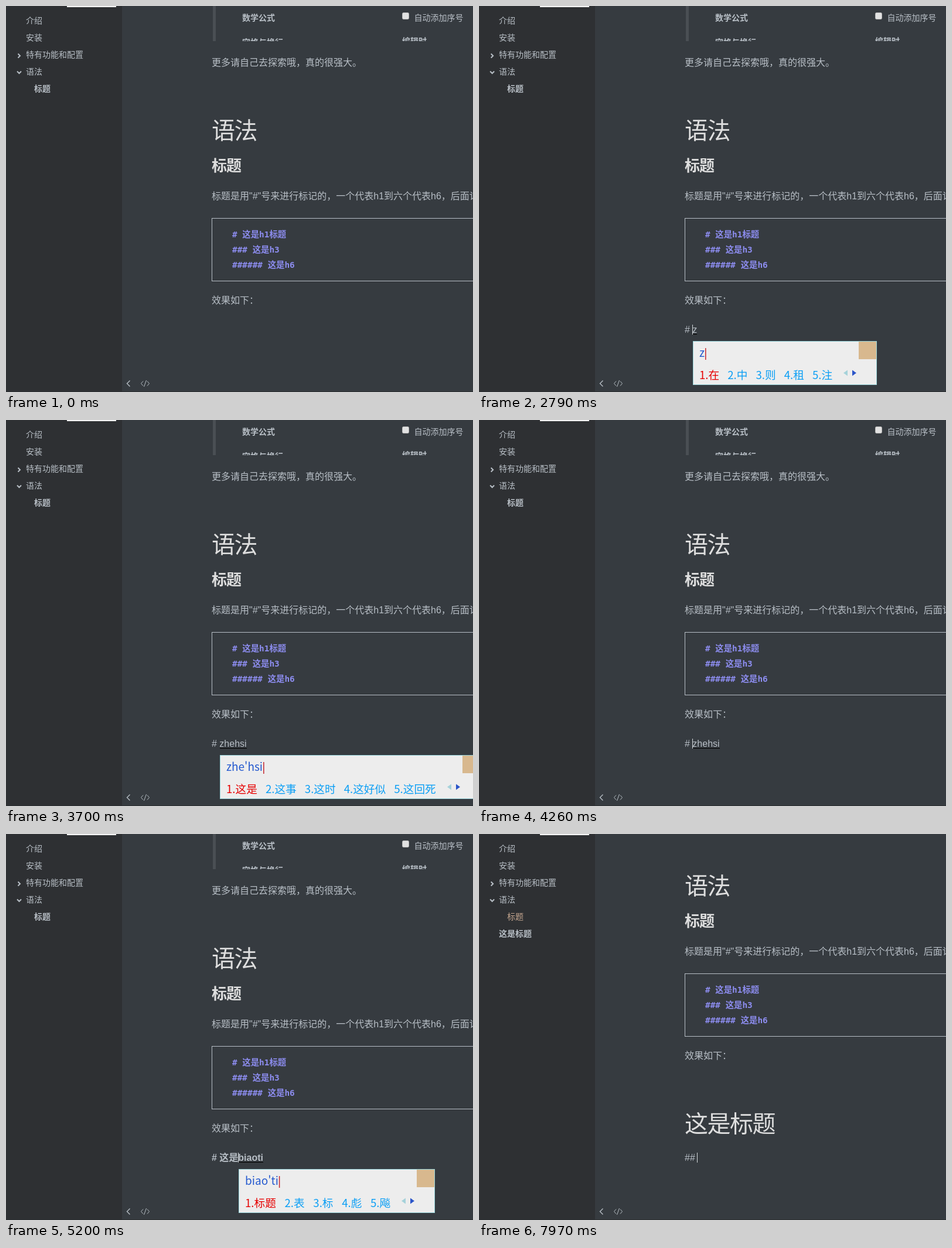
Recreate the animation shown at these times as an HTML page. Size 797 by 659 pixels, loop 8 s.

```html
<!DOCTYPE html>
<html lang="zh-CN">
<head>
<meta charset="utf-8">
<title>Markdown 标题</title>
<style>
html, body { margin: 0; width: 100%; height: 100%; overflow: hidden; background: #363b40; }
svg { display: block; width: 797px; height: 659px; }
text { font: 16px "Liberation Sans", "Noto Sans CJK SC", "Noto Sans CJK", sans-serif; fill: #b8bfc6; white-space: pre; }
.small text, text.small { font-size: 14px; }
text.bold { font-weight: bold; }
text.h1 { font-size: 40px; letter-spacing: -1.5px; fill: #dedede; }
text.h2 { font-size: 26.08px; letter-spacing: -1px; font-weight: bold; fill: #dedede; }
.code text { font: bold 14.4px "DejaVu Sans Mono", "Noto Sans CJK SC", "Noto Sans CJK", monospace; fill: #8d8df0; }
#popup text { font: 18.67px "Noto Sans CJK SC", "Noto Sans CJK", sans-serif; fill: #0c9ff5; }
#popup #spelling { font-size: 19px; fill: #2459cf; }
#popup .first { fill: #e60000; }
.icon { fill: none; stroke: #b8bfc6; }
</style>
</head>
<body>
<svg viewBox="0 0 797 659">
  <rect width="797" height="659" fill="#363b40"/>
  <g id="page">
    <rect x="353" width="5" height="60" fill="#4a4f54"/>
    <text class="small bold" x="403" y="25">数学公式</text>
    <rect x="676.5" y="11.5" width="11" height="11" rx="2" fill="#e2e2e2" stroke="#b4b4b4"/>
    <text class="small" x="696.5" y="25">自动添加序号</text>
    <text class="small bold" x="403" y="67">空格与换行</text>
    <text class="small bold" x="676" y="65">编辑时</text>
    <rect x="351" y="60" width="446" height="20" fill="#363b40"/>
    <text x="351" y="102">更多请自己去探索哦，真的很强大。</text>
    <text class="h1" x="351" y="227">语法</text>
    <text class="h2" x="351" y="282">标题</text>
    <text x="351" y="330">标题是用"#"号来进行标记的，一个代表h1到六个代表h6，后面记得加空格</text>
    <rect x="351.5" y="362.5" width="460" height="107" fill="none" stroke="#b8bfc6"/>
    <g class="code">
      <text x="386" y="395">#&#32;这是h1标题</text>
      <text x="386" y="421">### 这是h3</text>
      <text x="386" y="447">###### 这是h6</text>
    </g>
    <text x="351" y="508">效果如下：</text>
  </g>
  <text id="newHeading" class="h1" x="351" y="509">这是标题</text>
  <text id="line" x="351" y="558"></text>
  <rect id="underline" y="560" height="1" fill="#000"/>
  <rect id="caret" width="1" height="17" fill="#d5d9dd"/>

  <g class="small">
    <rect width="198" height="659" fill="#2e3033"/>
    <rect x="104" width="84" height="2" fill="#f4f4f4"/>
    <text x="34" y="30">介绍</text>
    <text x="34" y="59">安装</text>
    <text x="34" y="88">特有功能和配置</text>
    <text x="34" y="117">语法</text>
    <text id="subItem" x="48" y="146">标题</text>
    <text id="newItem" class="bold" x="34" y="175">这是标题</text>
    <path class="icon" stroke-width="2" d="M20.5 81.5l3.5 3.5-3.5 3.5M19 111.5l3.5 3.5 3.5-3.5"/>
  </g>
  <path class="icon" stroke-width="1.4" d="M211.5 639.5l-5 5 5 5"/>
  <path class="icon" d="M234 640.5l-3.5 4 3.5 4M241 640.5l3.5 4-3.5 4M239.5 639l-4 11"/>
  <rect y="658" width="797" height="1" fill="#2b2e31"/>

  <g id="popup">
    <rect id="panel" x=".5" y="572.5" height="74" fill="#ededed" stroke="#9bd8de"/>
    <rect id="badge" y="573" width="30" height="30" fill="#d8b88e"/>
    <text id="spelling" x="11" y="599"></text>
    <rect id="popupCaret" y="584" width="1.5" height="20" fill="#c4262e"/>
    <g id="choices"></g>
    <g id="arrows">
      <path d="M26 621.5v10l-7-5z" fill="#a5d2da"/>
      <path d="M34 621.5v10l7-5z" fill="#2b55c9"/>
    </g>
  </g>
</svg>
<script>
const LOOP = 8000, ENTER = 6060, OUTLINE = 6290;
const $ = id => document.getElementById(id);
const set = (el, attrs) => { for (const k in attrs) el.setAttribute(k, attrs[k]); };
const show = (el, on) => set(el, { visibility: on ? "visible" : "hidden" });

const candidates = {
  "z": "在 中 则 租 注",
  "zh": "这 中 着 只 主",
  "zhe": "这 着 这个 者 这是",
  "zhe'h": "这会 这好 这和 折合 这后",
  "zhe'h's": "这会是 这还是 这好似 这和 折合",
  "zhe'hsi": "这是 这事 这时 这好似 这回死",
  "b": "不 吧 把 被 比",
  "bi": "比 必 笔 闭 毕",
  "bi'a": "比啊 笔暗 必爱 彼岸 避安",
  "biao": "表 标 彪 飚 镖",
  "biao't": "标题 表态 表头 标贴 表图",
  "biao'ti": "标题 表 标 彪 飚"
};

// time, committed text, caret x (0 = hidden), letters being composed, popup spelling
const steps = [
  [0, "", 0], [300, "", 351], [800, "", 0], [1300, "", 351],
  [1430, "#", 360], [1930, "# ", 363], [2590, "# ", 0],
  [2740, "# ", 364, "z"], [2790, "# ", 364, "z", "z"],
  [2850, "# ", 364, "zh", "z"], [2900, "# ", 364, "zhe", "zh"],
  [2940, "# ", 364, "zhe", "zhe"],
  [3080, "# ", 364, "zheh", "zhe"], [3140, "# ", 364, "zhehs", "zhe'h"],
  [3200, "# ", 364, "zhehsi", "zhe'h's"], [3250, "# ", 364, "zhehsi", "zhe'hsi"],
  [3700, "# ", 0, "zhehsi", "zhe'hsi"], [4200, "# ", 364, "zhehsi", "zhe'hsi"],
  [4260, "# ", 364, "zhehsi"], [4310, "# 这是", 396],
  [4460, "# 这是", 396, "b"], [4520, "# 这是", 396, "b", "b"],
  [4600, "# 这是", 396, "bi", "b"], [4660, "# 这是", 396, "bi", "bi"],
  [4730, "# 这是", 396, "bia", "bi"], [4800, "# 这是", 396, "biao", "bi'a"],
  [4870, "# 这是", 396, "biao", "biao"],
  [5070, "# 这是", 396, "biaot", "biao"], [5130, "# 这是", 396, "biaot", "biao't"],
  [5200, "# 这是", 396, "biaoti", "biao'ti"],
  [5540, "# 这是", 396, "biaoti"], [5590, "# 这是标题", 428],
  [ENTER, "", 351], [6530, "", 0], [7030, "", 351],
  [7330, "#", 360], [7520, "##", 369], [7970, "## ", 372]
];

const choices = Array.from({ length: 5 }, (_, i) => {
  const el = document.createElementNS("http://www.w3.org/2000/svg", "text");
  set(el, { y: 637, class: i ? "" : "first" });
  return $("choices").appendChild(el);
});

function drawPopup(spelling, left, gap) {
  show($("popup"), spelling);
  if (!spelling) return;
  set($("popup"), { transform: `translate(${left} 0)` });
  $("spelling").textContent = spelling;
  set($("popupCaret"), { x: 12 + $("spelling").getComputedTextLength() });
  let x = 11, end = 0;
  candidates[spelling].split(" ").forEach((word, i) => {
    choices[i].textContent = `${i + 1}.${word}`;
    set(choices[i], { x });
    end = x + 18.67 * (0.833 + word.length);
    x = end + gap;
  });
  const width = Math.round(end + 76);
  set($("panel"), { width: width - 1 });
  set($("badge"), { x: width - 31 });
  set($("arrows"), { transform: `translate(${Math.round(end)} 0)` });
}

function drawStep([time, text, caretX, composing = "", spelling]) {
  const bold = text.length > 2 && time < ENTER;
  const start = bold ? 396 : 364;
  const line = $("line");
  line.textContent = text + composing;
  set(line, { class: bold ? "bold" : "" });
  show($("underline"), composing);
  if (composing) set($("underline"), { x: start + 1, width: Math.round(350 + line.getComputedTextLength() - start) });
  show($("caret"), caretX);
  set($("caret"), { x: caretX, y: text ? 544 : 545 });
  drawPopup(spelling, start + 1, bold ? 14.6 : 14);

  const entered = time >= ENTER;
  set($("page"), { transform: `translate(0 ${entered ? -124 : 0})` });
  show($("newHeading"), entered);
  set($("subItem"), { class: entered ? "" : "bold", style: entered ? "fill:#c2a48e" : "" });
}

let current;
function render(t) {
  const step = steps.findLast(s => s[0] <= t);
  if (step !== current) drawStep(current = step);
  show($("newItem"), t >= OUTLINE);
}

const began = performance.now();
function tick() {
  render((performance.now() - began) % LOOP);
  requestAnimationFrame(tick);
}
tick();
</script>
</body>
</html>
```
